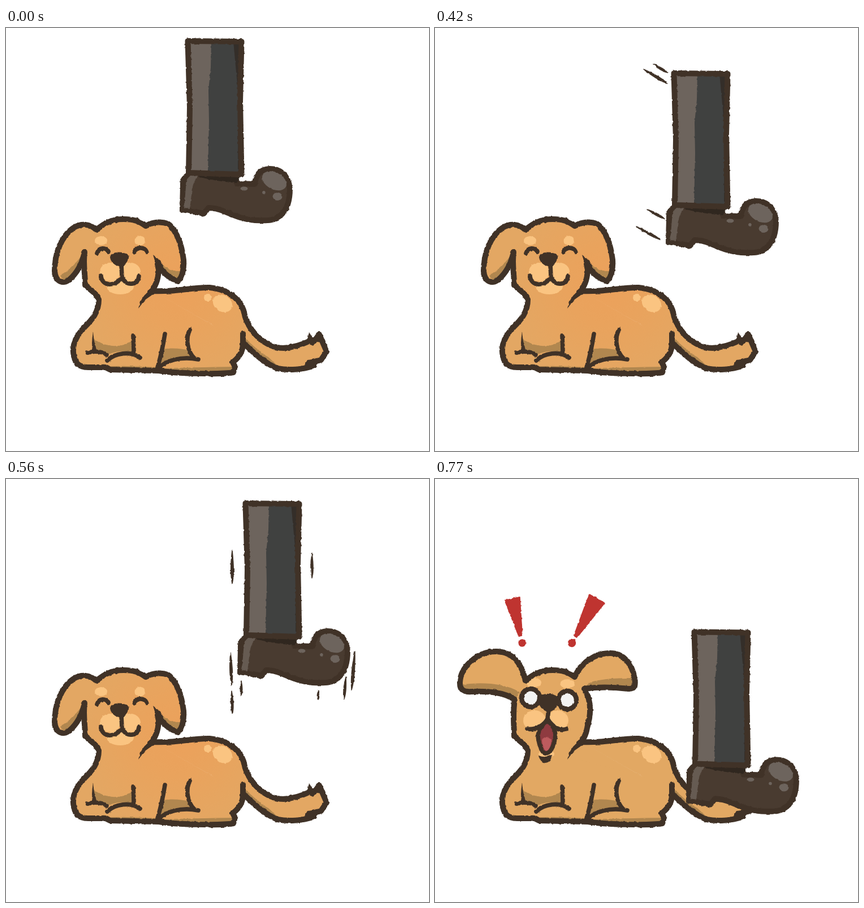
An HTML page that plays this animation: 748x748 px, repeating every 1050 ms.

```html
<!DOCTYPE html>
<html lang="en">
<head>
<meta charset="utf-8">
<title>Dog and boot</title>
<style>
  html, body { margin: 0; width: 100%; height: 100%; overflow: hidden; background: #fff; }
  svg { display: block; width: 100vw; height: 100vh; }
  .ink { fill: none; stroke: #403227; stroke-width: 10; stroke-linecap: round; stroke-linejoin: round; }
  .thin { stroke-width: 7.6; }
  .solid { fill: #403227; }
  .fur { fill: var(--fur); }
  .shade { fill: #b1874f; }
  .light { fill: #fac481; }
  .gloss { fill: #6d645d; }
  .eye { fill: #f3f3f2; stroke: #403227; stroke-width: 8.5; }
</style>
</head>
<body>
<svg viewBox="0 0 748 748">
  <defs>
    <filter id="rough" filterUnits="userSpaceOnUse" x="0" y="0" width="748" height="748" color-interpolation-filters="sRGB">
      <feTurbulence type="fractalNoise" baseFrequency=".16" numOctaves="2" seed="4"/>
      <feDisplacementMap in="SourceGraphic" scale="3" xChannelSelector="R" yChannelSelector="G"/>
    </filter>
    <radialGradient id="warm" gradientUnits="userSpaceOnUse" cx="305" cy="455" r="180">
      <stop offset="0" stop-color="#eca15b"/>
      <stop offset=".4" stop-color="#e9a35d"/>
      <stop offset="1" stop-color="#e3a763"/>
    </radialGradient>
    <!-- open outlines: filled first, inked after shading -->
    <path id="back" d="M259 465C305 467 330 458 360 459C400 463 419 486 422 508C432 541 460 565 490 566C515 564 532 556 539 552L546 552L554 542L567 572L557 587L534 593L545 597C525 604 500 606 480 602C458 593 438 575 419 556"/>
    <path id="front" d="M158 470L164 480C164 503 152 516 138 530C124 545 118 558 119 574C121 592 128 600 145 600L176 600L184 604L271 606C300 611 378 613 402 609L405 599L401 591C413 582 419 572 419 558L419 540"/>
    <path id="calmHead" d="M158 470L140 455C140 435 136 418 139 396C135 415 126 433 112 445C101 453 88 450 86 430C86 400 97 368 120 353C133 345 148 346 160 357C172 346 186 338 208 338C225 338 235 341 247 350C260 343 274 341 288 347C303 361 311 385 314 410C315 425 312 440 305 447C289 444 276 431 268 417L270 428C269 445 265 458 255 467"/>
    <path id="shockHead" d="M158 470L140 455C140 435 137 418 141 390C122 377 95 375 65 376C52 377 44 374 44 360C45 332 75 305 108 305C136 305 153 325 160 357C172 346 186 338 208 338C225 338 235 341 247 350C258 325 282 308 310 308C332 308 348 325 353 352C355 365 354 371 342 371C315 368 290 367 264 371C278 393 275 420 269 440C267 453 263 461 255 467"/>
    <path id="trouser" d="M321.500 23L416.500 24L414 130L416.500 259L323 256L325 140Z"/>
    <path id="neck" d="M264 460Q240 468 234 496Q240 488 247 480L261 470Z"/>
  </defs>

  <g filter="url(#rough)">
    <path class="fur" d="M158 466L262 466L419 556L164 520Z"/>
    <use href="#back" class="fur"/>
    <path class="shade" d="M423 549C440 564 452 576 464 582L482 599C460 593 440 577 423 562Z"/>
    <use href="#back" class="ink"/>
    <use href="#front" class="fur"/>
    <path class="shade" d="M155 550C172 561 200 570 224 552L227 574C205 569 190 573 179 578C174 572 165 570 158 571ZM278 568C295 565 310 567 324 570L332 581C310 578 290 583 274 594ZM125 592Q150 598 174 594L174 600L130 600ZM180 598Q220 597 268 600L263 606L184 604ZM276 602Q330 600 404 599L402 609L330 611Z"/>
    <ellipse class="light" cx="383" cy="487" rx="18" ry="14.500" transform="rotate(32 383 487)"/>
    <ellipse class="light" cx="357" cy="476.500" rx="7" ry="6.500"/>
    <use href="#front" class="ink"/>
    <path class="solid" d="M531 557L536 538L545 552L554 537L561 556L549 555L543 562ZM528 596L533 587L553 585L549 599ZM154 537Q150 558 154 575L162 573Q155 556 154 537ZM328 528Q318 536 316 548L324 548Z"/>
    <path class="ink thin" d="M144 574C158 571 170 572 178 578M179 588C192 575 220 570 237 583M271 601C282 588 310 580 340 586M225 544L226 570M281 541C278 560 274 580 268 600M325 534C317 550 321 572 333 584"/>
  </g>

  <g id="calm" filter="url(#rough)">
    <use href="#calmHead" class="fur"/>
    <path class="shade" d="M138 396C128 411 112 430 96 438L104 449C122 442 134 420 138 396ZM264 407C278 423 293 431 311 430L305 447C288 443 272 428 264 407Z"/>
    <g class="light">
      <ellipse cx="168" cy="376" rx="11" ry="8"/>
      <ellipse cx="237" cy="376" rx="9.500" ry="8.500"/>
      <ellipse cx="184" cy="431" rx="18" ry="16"/>
      <ellipse cx="220" cy="431" rx="18" ry="16"/>
      <ellipse cx="202" cy="457" rx="24" ry="14"/>
    </g>
    <use href="#calmHead" class="ink"/>
    <use href="#neck" class="solid"/>
    <path class="solid" d="M260 401Q276 412 278 422L268 428ZM184 404C186 394 215 394 217 404C218 413 210 421 202 423C193 420 184 414 184 404Z"/>
    <path class="ink thin" d="M161 398C164 388 177 387 181 396M227 396C231 386 245 387 249 396M168 438C169 457 194 459 205 440C211 457 233 456 235 439M204 418L205 440"/>
  </g>

  <g id="shock" filter="url(#rough)">
    <use href="#shockHead" class="fur"/>
    <path class="shade" d="M46 364C78 359 122 360 150 377L142 390C118 376 90 375 55 376ZM264 371L272 360C300 352 325 352 353 352L352 370C315 368 295 367 264 371Z"/>
    <g class="light">
      <ellipse cx="175" cy="360" rx="13" ry="8"/>
      <ellipse cx="234" cy="362" rx="12.500" ry="8"/>
      <ellipse cx="176" cy="427" rx="20" ry="18"/>
      <ellipse cx="217" cy="427" rx="19" ry="18"/>
      <ellipse cx="197" cy="486" rx="14" ry="6"/>
    </g>
    <use href="#shockHead" class="ink"/>
    <use href="#neck" class="solid"/>
    <path class="solid" d="M183 489Q195 494 206 488Q206 501 195 502Q186 501 183 489Z"/>
    <path class="ink thin" d="M199 428C185 437 179 450 184 466C188 481 192 486 197 485C207 483 212 466 213 452C212 440 207 433 199 428Z" style="fill:#8f3b40"/>
    <path d="M189 462C194 454 203 455 206 461C205 473 201 480 197 481C192 479 190 471 189 462Z" fill="#bd5b5e"/>
    <path class="ink thin" d="M163 442C178 444 193 436 199 424C207 438 220 446 232 442M201 408L199 424"/>
    <circle class="eye" cx="169" cy="387" r="16"/>
    <circle class="eye" cx="234" cy="391" r="16"/>
    <path class="solid" d="M182 390C182 377 216 376 218 389C219 401 210 411 201 412C190 410 183 401 182 390Z"/>
  </g>

  <g id="leg">
    <g filter="url(#rough)">
      <path class="ink" d="M323 259C315 264 312 270 313 279L312 321L350 328L358 318C385 318 405 338 440 340C466 341 475 341 488 329C500 317 502 300 502 284C499 257 482 249 466 249C449 250 441 260 440 276L408 275L406 262Z" style="fill:#493b30"/>
      <path d="M340 261L414 264L408 274Q370 271 340 263Z" fill="#30271f"/>
      <path d="M326 261L340 261Q328 276 328 295L325 319L315 318L318 282Q317 268 326 261Z" fill="#665b52"/>
      <g class="gloss">
        <ellipse cx="474.500" cy="270" rx="23" ry="15" transform="rotate(28 474 270)"/>
        <ellipse cx="421" cy="284" rx="6.500" ry="3.500"/>
        <circle cx="456" cy="291" r="2.800"/>
        <ellipse cx="480" cy="298" rx="8.500" ry="7"/>
      </g>
      <use href="#trouser" fill="#404140"/>
      <path class="gloss" d="M322 23L363 23L362 70L358 110L359 165L357 256L323 256L325 140Z"/>
      <path d="M402 24L416 24L415 250L410 250L411 120Z" fill="#342e29"/>
      <use href="#trouser" class="ink"/>
    </g>
  </g>
  <g id="streaks" filter="url(#rough)" class="solid" stroke="#403227" stroke-width="1.5" stroke-linejoin="round"></g>
  <g id="marks" filter="url(#rough)" fill="#bf3430" stroke="#bf3430" stroke-width="2" stroke-linejoin="round"></g>
</svg>
<script>
const $ = id => document.getElementById(id);
const LOOP = 1050, STEP = 70;
const mix = (a, b, k) => a + (b - a) * k;

// A tapered streak, fattest past its middle.
function streak(x, y, len, angle) {
  const w = 3 + len / 40;
  return `<path transform="translate(${x} ${y}) rotate(${angle})" d="M0 0Q${len * .7} ${-w} ${len} 0Q${len * .6} ${w} 0 0Z"/>`;
}

// A streak and its companion, offset by dx, dy and longer by dlen.
const pair = (angle, x, y, len, dx, dy, dlen) =>
  streak(x, y, len, angle) + streak(x + dx, y + dy, len + dlen, angle);

// Streaks left behind the swinging leg.
const trail = (x, y, k) =>
  pair(31, x + 268, y + 16, mix(43, 49, k), 17, -9, -20) +
  pair(29, x + mix(262, 255, k), y + mix(286, 294, k), mix(39, 48, k), mix(9, 20, k), mix(14, -30, k), -14);

// Upright streaks around the lifted leg.
const lift = () =>
  pair(90, 400, 126, 59, 141, 5, -15) +
  pair(88, 397, 307, 57, 2, 68, -17) +
  pair(90, 416, 357, 25, 136, 18, -10) +
  pair(95, 617, 305, 68, -16, 45, -28);

// Impact fan: steep on the left, flatter on the right.
const burst = () =>
  pair(71, 375, 222, 160, 21, 161, -60) +
  pair(71, 416, 300, 59, 14, 127, -33) +
  pair(74, 424, 198, 40, 23, 9, -21) +
  pair(119, 631, 192, 105, 17, 79, 31) +
  pair(121, 599, 321, 39, -5, 114, -6);

// Exclamation mark standing on its dot.
function mark(x, y, len, tilt) {
  const top = -13 - len, half = len * .2;
  return `<g transform="translate(${x} ${y}) rotate(${tilt})"><circle r="${2 + len * .055}"/>` +
    `<path d="M${-half} ${top}H${half}L3 -13H-3Z"/></g>`;
}

const marks = k =>
  mark(mix(178, 154, k), mix(333, 290, k), mix(46, 67, k), mix(-17, -12.5, k)) +
  mark(mix(236, 242, k), mix(319, 290, k), mix(65, 77, k), mix(23.5, 29.5, k));

// Swing right (0-3), lift (4-5), stomp (6-8).
function legAt(n) {
  if (n > 5) return [137, 247.5];
  if (n > 3) return [102, 57 - 18.5 * (n - 3)];
  return [101 * (1 - (1 - n / 3) ** 1.3), 19 * n];
}

function streaksAt(n, x, y) {
  if (n > 0 && n < 4) return trail(x, y, (n - 1) / 2);
  if (n === 5) return lift();
  return n === 6 || n === 7 ? burst() : '';
}

function show(n) {
  const [x, y] = legAt(n), hit = n > 5;
  $('leg').setAttribute('transform', `translate(${x} ${y})`);
  $('calm').style.display = hit ? 'none' : '';
  $('shock').style.display = hit ? '' : 'none';
  document.body.style.setProperty('--fur', hit ? '#e2a863' : 'url(#warm)');
  $('streaks').innerHTML = streaksAt(n, x, y);
  // the fan drifts outward from the boot
  $('streaks').setAttribute('transform', n === 7 ? 'translate(505 420) scale(1.28 1.15) translate(-505 -420)' : '');
  $('marks').innerHTML = hit ? marks((n - 6) / 2) : '';
}

const start = performance.now();
let shown;
function tick() {
  const t = (performance.now() - start) % LOOP;
  const n = Math.min(8, Math.max(0, Math.floor(t / STEP) - 3));
  if (n !== shown) show(shown = n);
  requestAnimationFrame(tick);
}
tick();
</script>
</body>
</html>
```
